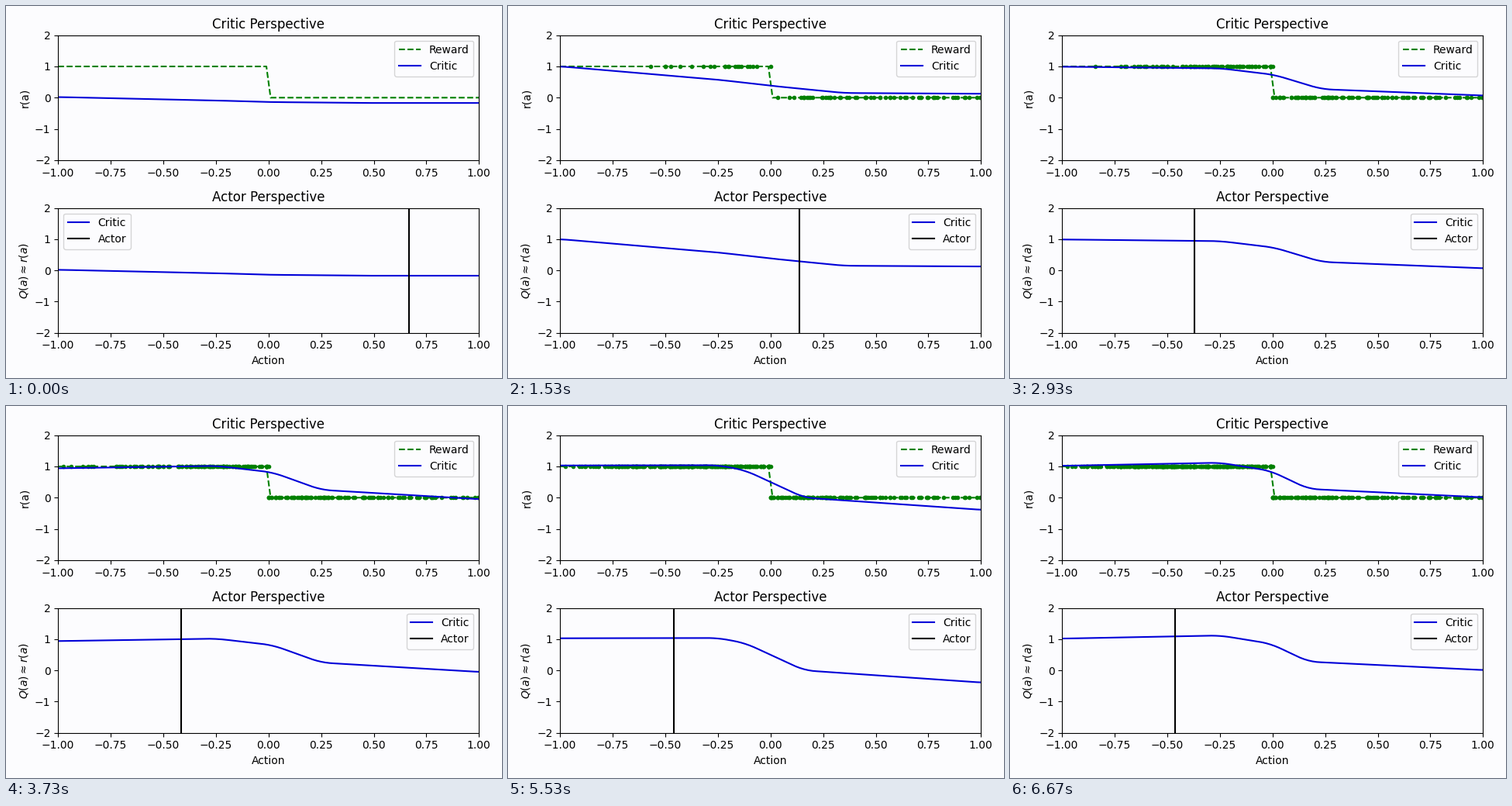
Recreate the animation shown at these times as a matplotlib script. Size 640 by 480 pixels, loop 6740 ms.

```python
import numpy as np
import matplotlib.pyplot as plt
from matplotlib.animation import FuncAnimation

W, H, DPI = 640, 480, 100
STEPS, LOOP_MS = 101, 6740
FRAMES = 2 * STEPS
PAPER, BLUE, GREEN = "#fcfcfe", "#0000d8", "#008000"

# Training milestones: step, actor, then the critic's value at the left edge,
# at the shoulder, its two knees (x, y, x, y) and its value at the right edge
SHOULDER = -.25
MILESTONES = np.array([
    [0, .667, .02, -.09, 0, -.14, .45, -.17, -.17],
    [14, .47, .79, .33, .06, .13, .45, .065, .10],
    [32, -.203, 1.075, .78, -.02, .585, .24, .20, .09],
    [56, -.415, .94, 1.02, .02, .81, .25, .25, -.05],
    [70, -.436, 1.25, 1.05, -.09, .87, .19, 0, -.41],
    [83, -.458, 1.03, 1.04, -.12, .875, .16, 0, -.39],
    [100, -.462, 1.02, 1.12, -.01, .86, .17, .28, .01],
])
keys, poses = MILESTONES[:, 0], MILESTONES[:, 1:]
slopes = np.gradient(poses, keys, axis=0)
actions = np.linspace(-1, 1, 201)


def pose(step):
    """Smooth cubic path through the milestones."""
    i = min(np.searchsorted(keys, step, side="right") - 1, len(keys) - 2)
    h = keys[i + 1] - keys[i]
    u = (step - keys[i]) / h
    ease = u * u * (3 - 2 * u)
    return (poses[i] + ease * (poses[i + 1] - poses[i])
            + h * u * (1 - u) * ((1 - u) * slopes[i] - u * slopes[i + 1]))


def critic_curve(left, shoulder, x1, y1, x2, y2, right):
    """Polyline through the corners, slightly rounded."""
    wide = np.linspace(-1.05, 1.05, 211)
    line = np.interp(wide, [-1, SHOULDER, x1, x2, 1],
                     [left, shoulder, y1, y2, right])
    return np.convolve(line, np.full(11, 1 / 11), "valid")


def explore():
    """Noisy actions around the actor, with the step each one appears at."""
    rng = np.random.default_rng(4)
    births = np.repeat(np.arange(1, STEPS), 4)
    centre = np.array([pose(s)[0] for s in births])
    tries = rng.normal(centre, .5 * np.exp(-births / 150))
    inside = abs(tries) < 1
    return tries[inside], births[inside]


def reward(a):
    return np.where(a < 0, 1.0, 0.0)


def add_panel(top, bottom, title, ylabel):
    left, right = 67.15, 610.3
    ax = fig.add_axes([left / W, 1 - bottom / H,
                       (right - left) / W, (bottom - top) / H])
    ax.set(xlim=(-1, 1), ylim=(-2, 2), title=title, ylabel=ylabel,
           xticks=np.linspace(-1, 1, 9), yticks=range(-2, 3),
           facecolor=PAPER)
    return ax


plt.rcParams["font.family"] = "DejaVu Sans"
fig = plt.figure(figsize=(W / DPI, H / DPI), dpi=DPI, facecolor=PAPER)
upper = add_panel(37.7, 198.85, "Critic Perspective", "r(a)")
lower = add_panel(260.7, 421.6, "Actor Perspective", r"$Q(a) \approx r(a)$")
lower.set_xlabel("Action")

samples, births = explore()
grid = np.linspace(-1, 1, 100)
upper.plot(grid, reward(grid), "--", color=GREEN, label="Reward")
dots, = upper.plot([], [], ".", color=GREEN)
critics = [ax.plot([], [], color=BLUE, label="Critic")[0]
           for ax in (upper, lower)]
actor = lower.axvline(0, color="black", label="Actor")
upper.legend(loc="upper right", facecolor=PAPER)
legend = lower.legend(loc="upper right", facecolor=PAPER)


def draw(frame):
    # two frames per training step
    step = min((frame + 1) // 2, STEPS - 1)
    action, *shape = pose(step)
    seen = samples[births <= step]
    dots.set_data(seen, reward(seen))
    curve = critic_curve(*shape)
    for line in critics:
        line.set_data(actions, curve)
    actor.set_xdata([action, action])
    # keep the legend clear of the actor line
    legend.set_loc("upper left" if action > .654 else "upper right")
    return [dots, *critics, actor, legend]


anim = FuncAnimation(fig, draw, frames=FRAMES, interval=LOOP_MS / FRAMES,
                     init_func=lambda: draw(0), repeat=True, repeat_delay=0,
                     blit=False)
plt.show()
```
